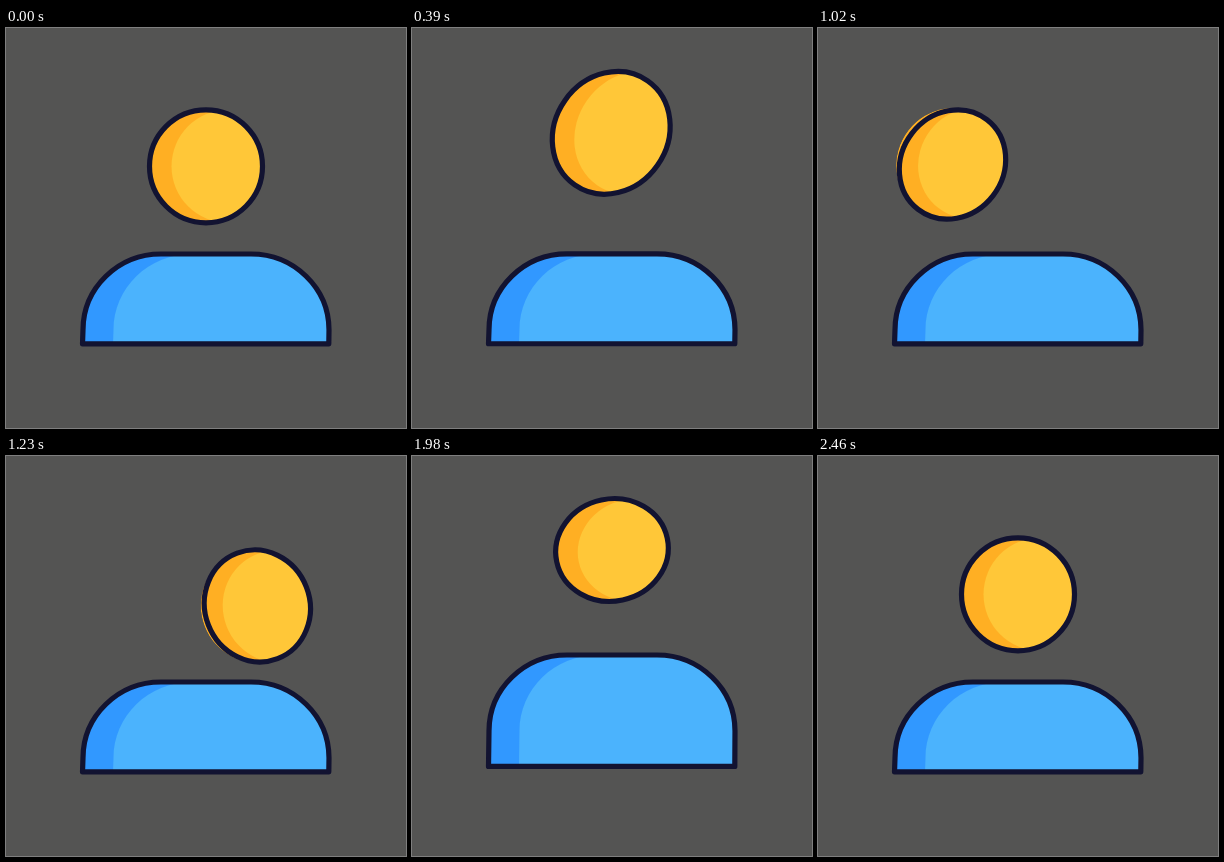
An HTML page with a canvas that plays this animation: 400x400 px, repeating every 4.02 s.

```html
<!DOCTYPE html>
<html lang="en">
<head>
<meta charset="utf-8">
<title>Looking around</title>
<style>
  html, body { margin: 0; height: 100%; overflow: hidden; background: #545453; }
  canvas { display: block; width: 100%; height: 100%; object-fit: contain; }
</style>
</head>
<body>
<canvas width="400" height="400"></canvas>
<script>
const ctx = document.querySelector('canvas').getContext('2d');
const LOOP = 4020, RADIUS = 56.5, OUTLINE = 5.2;

const smooth = u => u < .5 ? 4 * u ** 3 : 1 - 4 * (1 - u) ** 3;
const sine = u => (1 - Math.cos(Math.PI * u)) / 2;
const mix = (a, b, u) => a + (b - a) * u;

// Head path: start, end, cubic Bezier points x, y
const rest = [200, 138.3], top1 = [200, 95.5], top2 = [200, 94];
const left = [137, 138.5], right = [263, 138.5], windUp = [134.5, 136.5];
const line = (a, b) => [a, a, b, b];
const moves = [
  [30, 300, line(rest, top1)],
  [300, 600, [top1, [200, 125], [179, 139.5], left]],
  [930, 1020, line(left, windUp)],
  [1020, 1350, [windUp, [137, 163.5], [263, 163.5], right]],
  [1670, 1980, [right, [221, 139.5], [200, 124.7], top2]],
  [2070, 2460, line(top2, rest)]
];

// Time, stretch along the axis, axis angle from vertical, fill lag
const poses = [
  [30, 1, 0, 0], [150, 1.06, 0, 0], [300, 1, 10, 0], [390, 1.125, 35, 0],
  [460, 1.1, 55, 0], [600, 1, 60, 0], [601, 1, -52, 0], [930, 1, -52, 0],
  [1020, .905, -52.5, 2], [1120, 1.06, -90, 2], [1230, .93, -111, 2],
  [1350, 1, -111, 0], [1351, 1, -60, 0], [1770, 1, -55, 0],
  [1870, 1.09, -40, 0], [1980, .905, -12, 0], [2070, 1, 0, 0],
  [2260, 1.05, 0, 0], [2460, 1, 0, 0]
];

// Time, upward stretch of the shoulders
const lifts = [[30, 0], [210, 27], [400, 0], [1770, 0], [1980, 27], [2080, 26], [2400, 0]];

function sample(keys, t) {
  const next = keys.findIndex(k => k[0] > t);
  if (next <= 0) return keys.at(next).slice(1);
  const a = keys[next - 1], b = keys[next];
  const u = sine((t - a[0]) / (b[0] - a[0]));
  return a.slice(1).map((v, i) => mix(v, b[i + 1], u));
}

function headPosition(t) {
  const [start, end, points] = moves.findLast(m => m[0] <= t) || moves[0];
  const p = smooth(Math.min(1, Math.max(0, (t - start) / (end - start))));
  const q = 1 - p, weights = [q ** 3, 3 * q * q * p, 3 * q * p * p, p ** 3];
  return [0, 1].map(axis => points.reduce((sum, pt, i) => sum + pt[axis] * weights[i], 0));
}

function twoTone(shape, shade, light, offset) {
  ctx.save();
  ctx.clip(shape);
  ctx.fillStyle = shade;
  ctx.fill(shape);
  ctx.translate(offset, 0);
  ctx.fillStyle = light;
  ctx.fill(shape);
  ctx.restore();
}

function drawBody(lift) {
  const top = 226 - lift, shoulder = 302 - lift, bottom = 315.8 - lift * .2;
  const body = new Path2D(`M76.5 ${bottom}L77 ${shoulder}
    C77 ${shoulder - 42} 112 ${top} 155 ${top}H245
    C288 ${top} 323 ${shoulder - 42} 323 ${shoulder}L322.8 ${bottom}Z`);
  twoTone(body, '#3198ff', '#4bb3fd', 30.5);
  ctx.stroke(body);
}

function oval(x, y, stretch, angle) {
  const path = new Path2D();
  path.ellipse(x, y, RADIUS, RADIUS * stretch, angle, 0, 2 * Math.PI);
  return path;
}

function drawHead(t) {
  const [x, y] = headPosition(t);
  const [stretch, degrees, lag] = sample(poses, t);
  const angle = degrees * Math.PI / 180;
  const fill = oval(x + lag * Math.sin(angle), y - lag * Math.cos(angle),
    lag ? (1 + stretch) / 2 : stretch, angle);
  twoTone(fill, '#ffaf23', '#ffc738', 22);
  ctx.stroke(oval(x, y, stretch, angle));
}

function draw(now) {
  const t = now % LOOP;
  ctx.fillStyle = '#545453';
  ctx.fillRect(0, 0, 400, 400);
  ctx.strokeStyle = '#121331';
  ctx.lineWidth = OUTLINE;
  ctx.lineJoin = 'round';
  drawBody(sample(lifts, t)[0]);
  drawHead(t);
}

const begin = performance.now();
function frame() {
  draw(performance.now() - begin);
  requestAnimationFrame(frame);
}
frame();
</script>
</body>
</html>
```
